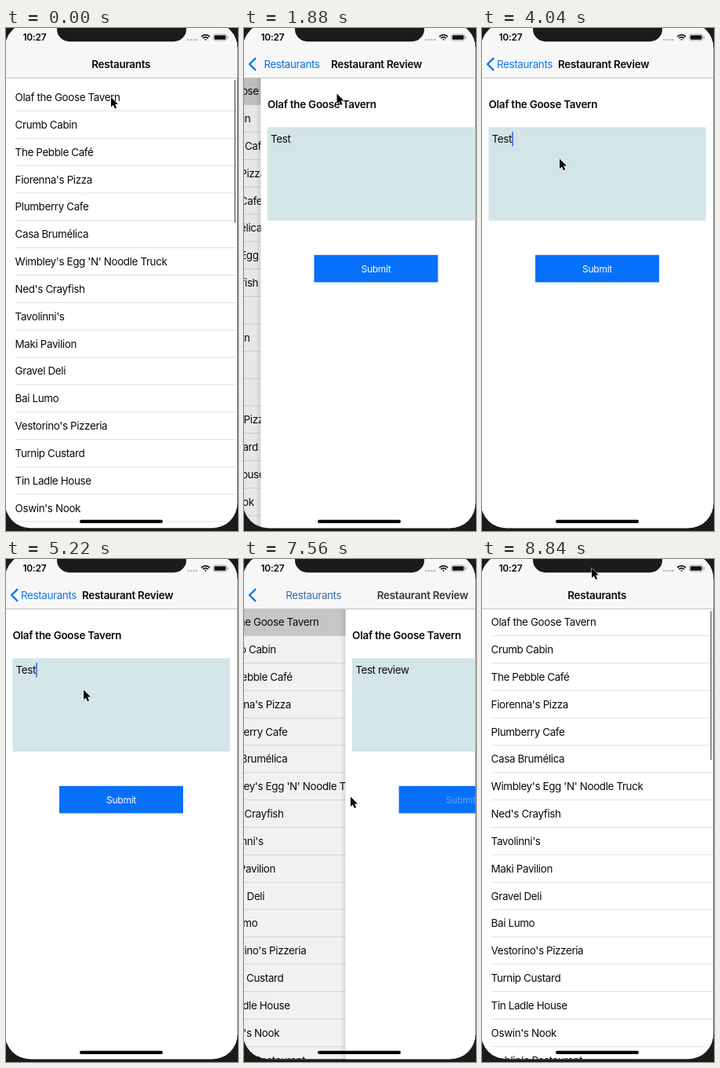
Animation, 296 px wide and 640 px high, one loop 9080 ms. Source, as an HTML page:

```html
<!DOCTYPE html>
<html lang="en">
<head>
<meta charset="utf-8">
<title>Restaurants</title>
<style>
html, body { margin: 0; width: 100%; height: 100%; overflow: hidden; background: #1b1b1b; }
svg { display: block; width: 296px; height: 640px; }
text { font: 400 13.4px Inter, Roboto, sans-serif; letter-spacing: -.36px; fill: #0a0a0a; white-space: pre; }
.bold { font-weight: 600; letter-spacing: -.24px; }
.small { font-size: 12px; letter-spacing: -.24px; }
</style>
</head>
<body>
<svg viewBox="0 0 296 640">
  <defs>
    <clipPath id="screen"><rect x="-1.1" y="-6.5" width="296.4" height="642.8" rx="32"/></clipPath>
    <linearGradient id="shade"><stop offset="0" stop-opacity="0"/><stop offset="1" stop-opacity=".1"/></linearGradient>
  </defs>
  <rect width="296" height="640" fill="#1b1b1b"/>
  <g clip-path="url(#screen)">
    <rect width="296" height="640" fill="#fff"/>
    <g id="list">
      <rect id="picked" y="63.5" width="296" height="34.3" fill="#d1d1d1"/>
      <g id="rows"></g>
    </g>
    <rect id="bar" x="291.1" y="66" width="2.2" rx="1.1" fill="#929292"/>
    <rect id="dim" y="64" width="296" height="576"/>
    <g id="detail">
      <rect x="-7" y="64" width="7" height="576" fill="url(#shade)"/>
      <rect y="64" width="297" height="576" fill="#fff"/>
      <text id="name" class="bold" x="8.5" y="101.6"></text>
      <rect x="8.3" y="126.3" width="277.5" height="118.7" fill="#d3e5e7"/>
      <text id="review" x="12.6" y="146"></text>
      <rect id="caret" y="132" width="1.6" height="18.5" fill="#3d6edb"/>
      <rect x="68" y="288.8" width="158" height="34.7" fill="#0770fa"/>
      <text id="submit" class="small" x="147" y="310.8" text-anchor="middle" style="fill:#fff">Submit</text>
    </g>
    <rect width="296" height="63.5" fill="#f7f7f7"/>
    <rect y="63" width="296" height=".8" fill="#b9b9b9"/>
    <path id="chevron" d="M14.3 38.8L7 46L14.3 53.2" fill="none" stroke="#0a78f0" stroke-width="2.4" stroke-linecap="round" stroke-linejoin="round"/>
    <text id="heading" class="bold" y="50.7">Restaurants</text>
    <text id="back" y="50.7">Restaurants</text>
    <text id="title" class="bold" y="50.7">Restaurant Review</text>
    <text class="bold small" x="21.5" y="16.2">10:27</text>
    <g fill="#b8b8b8">
      <circle cx="232.3" cy="15" r="1.3"/><circle cx="235.9" cy="15" r="1.3"/>
      <circle cx="239.5" cy="15" r="1.3"/><circle cx="243.1" cy="15" r="1.3"/>
    </g>
    <g fill="none" stroke="#111" stroke-width="1.7">
      <path d="M249.2 11Q254.6 6.4 260 11M251.2 13.2Q254.6 10.2 258 13.2"/>
      <path d="M253.2 14.5L254.6 16L256 14.5Q254.6 13.3 253.2 14.5Z" fill="#111" stroke="none"/>
      <rect x="264.6" y="8" width="17" height="8" rx="2.2" stroke="#999" stroke-width=".8"/>
      <rect x="265.8" y="9.2" width="14.6" height="5.6" rx="1.2" fill="#111" stroke="none"/>
      <path d="M283.2 10.6v2.8" stroke="#999" stroke-width="1.2"/>
    </g>
    <rect x="94" y="625.8" width="106" height="4.2" rx="2.1" fill="#050505"/>
  </g>
  <rect x="65" y="-20" width="165" height="37.2" rx="15.8" fill="#1b1b1b"/>
  <path id="cursor" d="M0 0V12.6L2.9 9.9L4.9 14.6L7.1 13.7L5.1 9.1H9Z" fill="#050505" stroke="#fff" stroke-width="1" paint-order="stroke"/>
</svg>
<script>
const LOOP = 9080, WIDTH = 296, PITCH = 34.83;
const INK = [10, 10, 10], BLUE = [10, 120, 240];
const places = ["Olaf the Goose Tavern", "Crumb Cabin", "The Pebble Café", "Fiorenna's Pizza",
  "Plumberry Cafe", "Casa Brumélica", "Wimbley's Egg 'N' Noodle Truck", "Ned's Crayfish",
  "Tavolinni's", "Maki Pavilion", "Gravel Deli", "Bai Lumo", "Vestorino's Pizzeria",
  "Turnip Custard", "Tin Ladle House", "Oswin's Nook", "Doblin's Restaurant"];
// time, x, y of the pointer's resting points
const stops = [[0, 134, 88], [560, 118.5, 82], [1000, 118.5, 82], [1300, 118.5, 83.5],
  [2300, 118.5, 83.5], [2720, 99, 166.5], [6300, 99, 166.5], [6920, 136, 302.5],
  [8050, 136, 302.5], [8700, 140, 11.5]];
const ui = {};
document.querySelectorAll("[id]").forEach(e => ui[e.id] = e);
const set = (e, attrs) => { for (const k in attrs) e.setAttribute(k, attrs[k]); };
const clamp = v => Math.max(0, Math.min(1, v));
const ramp = (t, a, b) => clamp((t - a) / (b - a));
const smooth = v => v * v * (3 - 2 * v);
const mix = (a, b, k) => a + (b - a) * k;
const blend = (a, b, k) => `rgb(${a.map((v, i) => Math.round(mix(v, b[i], k)))})`;
const shift = (e, x, y = 0) => e.setAttribute("transform", `translate(${x.toFixed(2)} ${y.toFixed(2)})`);

function spring(ms) {
  const x = Math.max(0, ms) * .0107;
  return 1 - (1 + x) * Math.exp(-x);
}

function add(tag, attrs, label = "") {
  const e = document.createElementNS("http://www.w3.org/2000/svg", tag);
  set(e, attrs);
  e.textContent = label;
  ui.rows.append(e);
}

places.forEach((label, i) => {
  add("text", { x: 11.6, y: 85.3 + i * PITCH }, label);
  add("rect", { x: 11.6, y: 97.3 + i * PITCH, width: 284, height: .8, fill: "#d9d9d9" });
});
ui.name.textContent = places[0];

function pointer(t) {
  let i = 0;
  while (i < stops.length - 2 && t > stops[i + 1][0]) i++;
  const [a, b] = [stops[i], stops[i + 1]];
  const k = smooth(ramp(t, a[0], b[0]));
  return [mix(a[1], b[1], k), mix(a[2], b[2], k)];
}

function draw(t) {
  const push = spring(t - 1480);
  const open = push - spring(t - 7422);
  const nav = push - spring(t - 7438);
  const left = WIDTH * (1 - open);
  const pull = t < 1340 ? 7.9 * Math.exp(-t / 200) : 0;

  shift(ui.list, -.3 * WIDTH * open);
  shift(ui.rows, 0, pull);
  set(ui.picked, { opacity: t < 1340 ? 0 : 1 - smooth(ramp(t, 7650, 8250)) });
  set(ui.bar, { height: 190 - pull, opacity: t < 1340 ? 1 - ramp(t, 700, 920) : ramp(t, 8300, 8500) });
  set(ui.dim, { opacity: .1 * open });
  shift(ui.detail, left);
  set(ui.detail, { visibility: open > .001 ? "visible" : "hidden" });

  // navigation bar
  set(ui.heading, { x: mix(109.3, 19, nav), opacity: clamp(1 - nav * 2.5) });
  set(ui.back, { x: mix(109.3, 19, nav), opacity: clamp(nav * 1.3) });
  ui.back.style.fill = blend(INK, BLUE, nav);
  set(ui.title, { x: mix(289, 97, nav), opacity: clamp(nav * 1.3) });
  set(ui.chevron, { opacity: clamp(nav * 1.6) });

  // review field
  const typed = Math.max(0, Math.min(7, Math.floor((t - 5330) / 105)));
  ui.review.textContent = "Test review".slice(0, 4 + typed);
  const beat = Math.abs(((t - 5270) % 1000 + 1500) % 1000 - 500);
  const blink = typed > 0 && t < 6300 ? 1 : 1 - ramp(beat, 270, 400);
  set(ui.caret, {
    x: 12.8 + ui.review.getComputedTextLength(),
    opacity: t > 3000 && t < 7417 ? blink : 0
  });
  set(ui.submit, { opacity: t < 7250 ? 1 : mix(.22, 1, ramp(t, 7480, 7980)) });

  shift(ui.cursor, ...pointer(t));
}

function tick() {
  draw(performance.now() % LOOP);
  requestAnimationFrame(tick);
}
tick();
</script>
</body>
</html>
```
